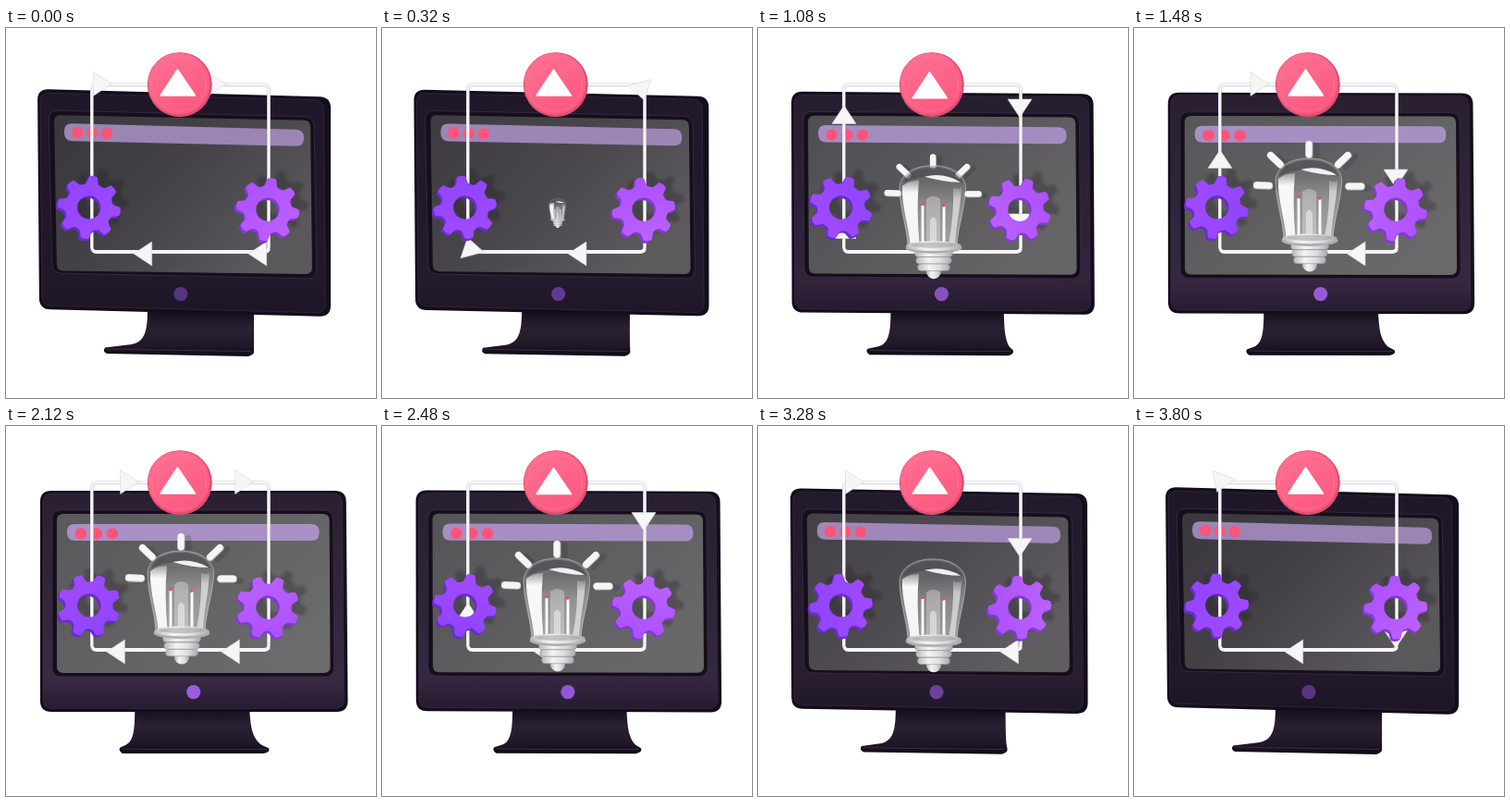
Write an HTML page that moves like this. It is 400 px wide and 400 px high and loops after 3.84 s.

```html
<!DOCTYPE html>
<html lang="en">
<head>
<meta charset="utf-8">
<title>Idea workflow</title>
<style>
html, body { margin: 0; width: 100%; height: 100%; overflow: hidden; background: #fff; }
svg { display: block; width: 100vw; height: 100vh; }
</style>
</head>
<body>
<svg viewBox="0 0 400 400">
  <defs>
    <linearGradient id="bodyFill" x1="0" y1="0" x2="0" y2="1">
      <stop offset="0"/><stop offset=".86"/><stop offset="1"/>
    </linearGradient>
    <linearGradient id="screenFill" x1="0" y1="0" x2="1" y2=".6">
      <stop offset="0"/><stop offset=".5"/><stop offset="1"/>
    </linearGradient>
    <linearGradient id="standFill" x1="0" y1="0" x2="0" y2="1">
      <stop offset="0" stop-color="#120c19"/><stop offset=".4" stop-color="#2a2033"/>
      <stop offset=".78" stop-color="#201729"/><stop offset="1" stop-color="#0e0914"/>
    </linearGradient>
    <linearGradient id="violetA" x1="0" y1="0" x2="1" y2="1">
      <stop offset="0" stop-color="#8d43ff"/><stop offset="1" stop-color="#a34cff"/>
    </linearGradient>
    <linearGradient id="violetB" x1="0" y1="0" x2="1" y2="1">
      <stop offset="0" stop-color="#aa4dff"/><stop offset="1" stop-color="#be64ff"/>
    </linearGradient>
    <linearGradient id="pink" x1=".2" y1="0" x2=".7" y2="1">
      <stop offset="0" stop-color="#ff7092"/><stop offset="1" stop-color="#fb587e"/>
    </linearGradient>
    <linearGradient id="glass" x1="0" y1="0" x2="0" y2="1">
      <stop offset="0" stop-color="#8b8b8e" stop-opacity=".5"/><stop offset=".2" stop-color="#8f8f92" stop-opacity=".3"/>
      <stop offset=".5" stop-color="#fff" stop-opacity=".3"/><stop offset="1" stop-color="#fff" stop-opacity=".42"/>
    </linearGradient>
    <linearGradient id="streak" x1="0" y1="0" x2="0" y2="1">
      <stop offset="0" stop-color="#fff" stop-opacity=".35"/><stop offset=".2" stop-color="#fff" stop-opacity=".95"/>
      <stop offset="1" stop-color="#fff" stop-opacity=".9"/>
    </linearGradient>
    <linearGradient id="metal" x1="0" y1="0" x2="1" y2="0">
      <stop offset="0" stop-color="#b9b9bb"/><stop offset=".35" stop-color="#f4f4f5"/>
      <stop offset=".7" stop-color="#dcdcde"/><stop offset="1" stop-color="#a9a9ac"/>
    </linearGradient>
    <filter id="soft" x="-30%" y="-30%" width="160%" height="160%"><feGaussianBlur stdDeviation="1.6"/></filter>
    <clipPath id="screenClip"><path id="clipShape"/></clipPath>
  </defs>

  <path id="stand" fill="url(#standFill)"/>
  <path id="standEdge" fill="none" stroke="#3b2c4a" stroke-width="1"/>
  <path id="shell" fill="#140d1b"/>
  <path id="front" fill="url(#bodyFill)" stroke="#45365a" stroke-width=".8" stroke-opacity=".6"/>
  <path id="inset" fill="#150f1b" stroke="#3b2d48" stroke-width=".8"/>
  <path id="screen" fill="url(#screenFill)"/>
  <path id="bar"/>
  <g id="dots" fill="#ff5379"></g>
  <circle id="power" cy="287.6" r="7.6"/>
  <g id="shadows" clip-path="url(#screenClip)" opacity=".26" filter="url(#soft)"></g>

  <g fill="none" stroke-linejoin="round">
    <rect x="92.8" y="61.4" width="191.2" height="180.6" rx="5" stroke="#c9c9ce" stroke-width="3.6"/>
    <rect x="92.8" y="61.1" width="191.2" height="180.6" rx="5" stroke="#f6f6f8" stroke-width="2.6"/>
    <path d="M94 240.5Q95 242 98 242H279Q283 242 284 239" stroke="#f6f6f8" stroke-width="3.8"/>
  </g>
  <g id="arrows" fill="#f6f6f7" stroke="#d6d6da" stroke-width=".6" stroke-linejoin="round"></g>

  <g id="bulb">
    <g id="rays" stroke-linecap="round"></g>
    <path d="M162 233C161 212 153 192 153 170C154 154 171 146 189 146C207 146 224 154 224.5 170C224 192 216 212 215 233Z" fill="url(#glass)" stroke="#dededf" stroke-opacity=".5" stroke-width="1"/>
    <path d="M157 165C161 153 175 148 189 148C203 148 217 153 221 165C207 156 171 156 157 165Z" fill="#434346" opacity=".55"/>
    <path d="M156 168Q163 162 174 162Q171 192 174.5 231H164.5C163 211 155 190 156 168Z" fill="url(#streak)"/>
    <path d="M180 158Q201 153 219 164Q201 164 180 158Z" fill="#fff" opacity=".9"/>
    <path d="M211 170Q217 172 220 170C219 190 214 211 213 231H206Q212 200 211 170Z" fill="url(#streak)" opacity=".6"/>
    <path d="M182 231V182Q189 176 197 182V231Z" fill="#fff" opacity=".3"/>
    <path d="M186 231V205Q189 198 193 205V231Z" fill="#fff" opacity=".45"/>
    <path d="M178 189V230M201 190V230" stroke="#fafafa" stroke-width="3"/>
    <g fill="#d8586a"><circle cx="178" cy="187.5" r="1.9"/><circle cx="200.5" cy="189" r="1.9"/></g>
    <circle cx="190" cy="260.5" r="8" fill="url(#metal)"/>
    <g id="screw" fill="url(#metal)" stroke="#8e8e92" stroke-width=".6"></g>
    <ellipse cx="190" cy="235" rx="30.5" ry="6" fill="#aeaeb1"/>
    <ellipse cx="190" cy="233" rx="30" ry="5.4" fill="url(#metal)"/>
    <ellipse cx="190" cy="232" rx="24" ry="3" fill="#99999c" opacity=".5"/>
  </g>

  <g id="gears"></g>

  <circle cx="187.8" cy="61.2" r="35" fill="#e04c70"/>
  <circle cx="187" cy="60.2" r="33.4" fill="url(#pink)"/>
  <circle cx="187" cy="60.6" r="29.5" fill="none" stroke="#ff86a3" stroke-opacity=".4" stroke-width="1"/>
  <path id="mark" d="M185.5 45L167 73H204.5Z" fill="#fff" stroke="#fff" stroke-width="1.4" stroke-linejoin="round"/>
</svg>
<script>
const LOOP = 3840, STEP = 40, TAU = Math.PI * 2;
const $ = id => document.getElementById(id);
const set = (el, attrs) => { for (const k in attrs) el.setAttribute(k, attrs[k]); return el; };
const add = (parent, tag, attrs) =>
  parent.appendChild(set(document.createElementNS('http://www.w3.org/2000/svg', tag), attrs));
const lerp = (a, b, k) => a + (b - a) * k;
const ramp = (t, a, b) => {
  const k = Math.min(1, Math.max(0, (t - a) / (b - a)));
  return k * k * (3 - 2 * k);
};
const mix = (a, b, k) => 'rgb(' + [1, 3, 5].map(i =>
  Math.round(lerp(parseInt(a.slice(i, i + 2), 16), parseInt(b.slice(i, i + 2), 16), k))) + ')';

// Monitor panels: corners turned away, corners facing front, corner radius
const panels = {
  shell: [[34, 66, 351, 74.5, 351, 312, 36, 304], [37, 70, 368, 70, 370, 309, 37, 309], 12],
  front: [[37, 70, 343.5, 78, 345.5, 308, 39, 300], [40, 73, 364, 73, 366, 305.5, 40, 305.5], 10],
  inset: [[46, 89, 333, 96, 336, 271, 50, 265], [50, 91, 354, 91, 355, 271, 50, 271], 10],
  screen: [[52, 94, 329, 100, 331, 266, 55, 262.5], [55, 95, 350, 95, 351, 267, 55, 267], 7],
  bar: [[63, 103, 322, 110, 322, 128, 63, 122], [66, 106, 339, 106, 339, 124, 66, 124], 8.5]
};

function roundQuad([far, near, r], k) {
  const v = far.map((a, i) => lerp(a, near[i], k));
  const pt = i => [v[(i % 4) * 2], v[(i % 4) * 2 + 1]];
  const toward = (a, b) => {
    const d = r / Math.hypot(b[0] - a[0], b[1] - a[1]);
    return [lerp(a[0], b[0], d), lerp(a[1], b[1], d)];
  };
  let d = '';
  for (let i = 0; i < 4; i++) {
    const c = pt(i);
    d += (i ? 'L' : 'M') + toward(c, pt(i + 3)) + 'Q' + c + ' ' + toward(c, pt(i + 1));
  }
  return d + 'Z';
}

function tint(id, far, near, k) {
  [...$(id).children].forEach((s, i) => s.setAttribute('stop-color', mix(far[i], near[i], k)));
}

function drawMonitor(p) {
  for (const id in panels) $(id).setAttribute('d', roundQuad(panels[id], p));
  $('clipShape').setAttribute('d', $('screen').getAttribute('d'));
  tint('bodyFill', ['#1f1728', '#211829', '#1d1525'], ['#2a2032', '#382a45', '#271c31'], p);
  tint('screenFill', ['#39373d', '#444247', '#5a585b'], ['#5a595c', '#626163', '#6b6a6d'], p);
  $('bar').setAttribute('fill', mix('#9b85b4', '#a990c5', p));
  dots.forEach((c, i) => set(c, {
    cx: lerp(77 + 16 * i, 81 + 17 * i, p), cy: lerp(113 + i * .5, 116.5, p), r: 6.2
  }));
  set($('power'), { cx: lerp(188.8, 203, p), fill: mix('#573583', '#9d5de0', p) });

  const q = p * p, L = (a, b) => lerp(a, b, p), R = (a, b) => lerp(a, b, q);
  const foot = L(107, 124), heel = R(268, 285);
  $('stand').setAttribute('d',
    `M${L(153, 139)} 304C${L(153, 139)} 328 ${L(150, 138)} ${L(339, 341)} ${L(136, 129)} ${L(342, 345)}` +
    `L${foot} ${L(345.5, 347.5)}Q${foot - 3} 350 ${foot + 2} ${L(352, 354)}` +
    `L${heel - 6} ${L(355, 354)}Q${heel + 1} 353 ${heel} 348.5` +
    `L${R(268, 277)} 345C${R(268, 267)} 338 ${R(268, 264)} 328 ${R(268, 263)} 304Z`);
  $('standEdge').setAttribute('d', `M${foot + 2} ${L(347, 349)}Q150 ${L(348, 350)} ${heel - 3} 349.5`);
}

function gearPath(teeth, root, tip, hole) {
  let d = '';
  const pitch = TAU / teeth;
  const at = (r, a) => (r * Math.sin(a)).toFixed(2) + ' ' + (-r * Math.cos(a)).toFixed(2);
  for (let i = 0; i < teeth; i++) {
    const a = i * pitch;
    d += (i ? 'L' : 'M') + at(root, a - pitch * .29) + 'L' + at(tip, a - pitch * .15) +
      'Q' + at(tip + 1.2, a) + ' ' + at(tip, a + pitch * .15) + 'L' + at(root, a + pitch * .29) +
      'Q' + at(root - 2, a + pitch / 2) + ' ' + at(root, a + pitch * .71);
  }
  return d + `ZM${-hole} 0a${hole} ${hole} 0 1 0 ${hole * 2} 0a${hole} ${hole} 0 1 0 ${-hole * 2} 0Z`;
}

const outline = gearPath(8, 25.8, 33, 13.5);
const gears = [
  { x: 89.3, y: 194.5, face: 'url(#violetA)', side: '#6a2ccc' },
  { x: 282.5, y: 196.8, face: 'url(#violetB)', side: '#8439d6' }
].map(g => {
  const part = (parent, dx, dy, fill, edge) => ({
    dx, dy, el: add(parent, 'path', {
      d: outline, fill, stroke: fill, 'stroke-width': edge, 'fill-rule': 'evenodd', 'stroke-linejoin': 'round'
    })
  });
  return { ...g, parts: [
    part($('shadows'), 11, -9, '#1b191e', 0), part($('gears'), -1.5, 1.8, g.side, 1.6),
    part($('gears'), -.6, .9, g.side, 1.6), part($('gears'), .5, -.6, g.face, 1.6)
  ] };
});

// Clockwise track, starting at the top left corner
const X0 = 93, X1 = 283, Y0 = 60.5, Y1 = 244, W = X1 - X0, H = Y1 - Y0, ROUND = 2 * (W + H);
function track(s) {
  s = (s % ROUND + ROUND) % ROUND;
  if (s < W) return [X0 + s, Y0];
  if ((s -= W) < H) return [X1, Y0 + s];
  if ((s -= H) < W) return [X1 - s, Y1];
  return [X0, Y1 - (s - W)];
}

function placeArrow(el, s) {
  const [x, y] = track(s), [u, v] = track(s - 20);
  let cx = (x + u) / 2, cy = (y + v) / 2, deg = Math.atan2(y - v, x - u) * 360 / TAU;
  // the top left corner is taken with a long backward spin
  const rel = (s + 40) % ROUND - 40;
  if (rel > -20 && rel < 14) {
    const k = (rel + 20) / 34;
    deg = -90 - 270 * Math.min(1, k * 1.25);
    cx = lerp(X0 - 1, X0 + 2, k);
    cy = 62;
  }
  el.setAttribute('transform', `translate(${cx} ${cy}) rotate(${deg})`);
}

const dots = [0, 1, 2].map(() => add($('dots'), 'circle', {}));
const arrows = [0, 124, ROUND / 2, ROUND / 2 + 124].map(offset =>
  ({ offset, el: add($('arrows'), 'path', { d: 'M10 0L-9.7 -13V13Z' }) }));

[[41, 241], [38.5, 248.5], [35, 256]].forEach(([w, y]) =>
  add($('screw'), 'rect', { x: 190 - w / 2, y: y - 3.6, width: w, height: 7.4, rx: 3.7 }));

const rays = [[189, 130.5, 189, 141.5], [147.5, 142.5, 158, 152.5], [231, 142.5, 220.5, 152.5],
  [132.5, 174.8, 146, 175.3], [232, 176, 245.5, 176]].map(([x1, y1, x2, y2]) => {
  const g = add($('rays'), 'g', {});
  const line = (dx, dy, stroke, w, opacity) => add(g, 'line',
    { x1: x1 + dx, y1: y1 + dy, x2: x2 + dx, y2: y2 + dy, stroke, 'stroke-width': w, opacity });
  line(8, 2, '#2a282c', 7, .2);
  line(.4, .6, '#bcbcc0', 8, 1);
  line(0, 0, '#f6f6f7', 7, 1);
  return g;
});

function grow(el, x, y, k, dy = 0) {
  set(el, {
    transform: `translate(${x} ${y + dy}) scale(${k}) translate(${-x} ${-y})`,
    display: k > .01 ? 'inline' : 'none'
  });
}

function render(t) {
  drawMonitor(Math.pow((1 - Math.cos(TAU * t / LOOP)) / 2, .75));

  const turn = 8 + t * .0922;
  for (const g of gears) for (const s of g.parts)
    s.el.setAttribute('transform', `translate(${g.x + s.dx} ${g.y + s.dy}) rotate(${turn})`);
  for (const a of arrows) placeArrow(a.el, 21 + t * .19 + a.offset);

  const beat = t / (LOOP / 2) % 1;
  const bob = -4.6 - 7.7 * Math.cos(TAU * (beat - .01));
  grow($('bulb'), 190, 210, ramp(t, 200, 560) * (1 - ramp(t, 3320, 3680)), bob);
  const shine = ramp(t, 800, 1160) * (1 - ramp(t, 2880, 3200));
  rays.forEach(r => grow(r, 189, 180, shine));

  const press = 8.3 * Math.exp(-Math.pow((beat - .46) / .1, 2));
  $('mark').setAttribute('transform', `translate(0 ${press})`);
}

const start = performance.now();
function tick() {
  const t = (performance.now() - start) % LOOP;
  render(t < 2 * STEP ? 0 : Math.floor(t / STEP) * STEP);
  requestAnimationFrame(tick);
}
render(0);
requestAnimationFrame(tick);
</script>
</body>
</html>
```
